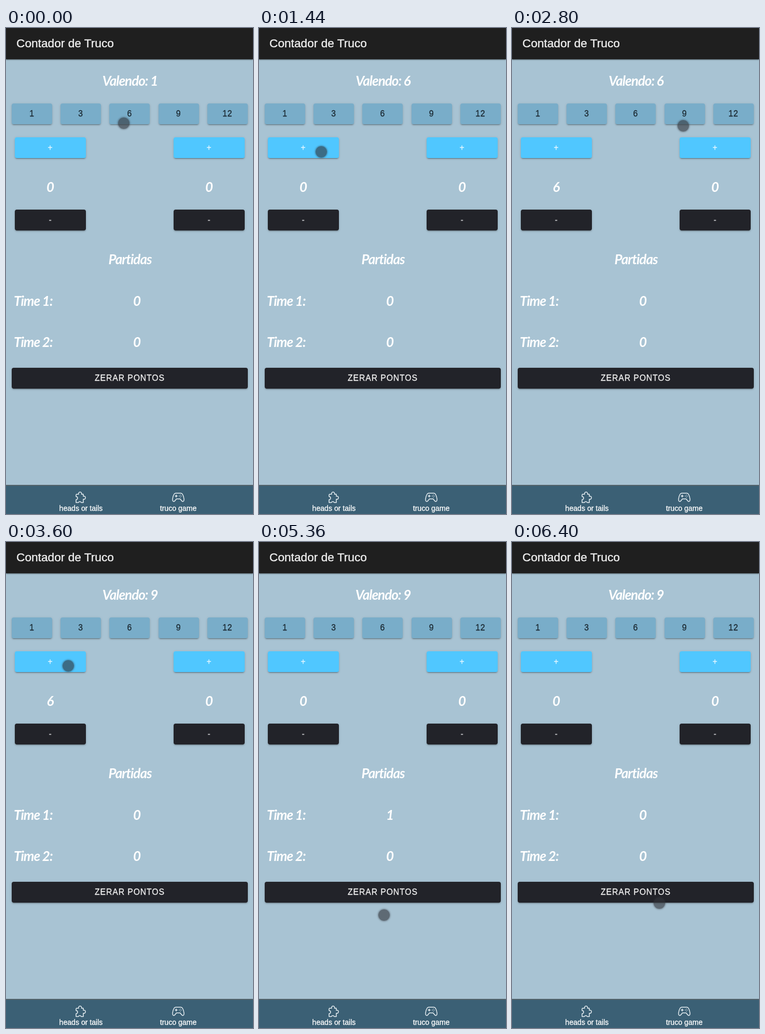
An HTML page for the animation above (6.48 s loop, 476 by 934 pixels).

```html
<!DOCTYPE html>
<html lang="pt">
<head>
<meta charset="utf-8">
<title>Contador de Truco</title>
<style>
  html, body { margin: 0; width: 100%; height: 100%; overflow: hidden; }
  body { position: relative; background: #a8c3d3; font-family: "Liberation Sans", Arial, sans-serif; }
  body > * { position: absolute; box-sizing: border-box; white-space: pre; }

  header {
    left: 0; top: 0; width: 476px; height: 60px; padding-left: 20px;
    background: #1f1f1f; color: #f0f0f0; font-size: 22.7px; line-height: 59px;
    -webkit-text-stroke: .4px; box-shadow: 0 1px 2px rgba(0, 0, 0, .6);
  }
  footer {
    left: 0; top: 878px; width: 476px; height: 56px;
    background: #3b6075; border-top: 2px solid #52626a;
  }
  .tab {
    top: 915px; transform: translateX(-50%); color: #fff;
    font-size: 14.1px; line-height: 17px; -webkit-text-stroke: .3px;
  }
  svg {
    top: 890px; width: 24px; height: 24px; fill: none; stroke: #e8eff3;
    stroke-width: 1.5; stroke-linejoin: round; stroke-linecap: round;
  }

  .hand {
    color: #fff; font: italic 700 26px/40px Lato, sans-serif;
    letter-spacing: -1px; transform: translate(-50%, -50%);
  }
  .hand.left { transform: translateY(-50%); }

  .button {
    height: 40px; border-radius: 4px; text-align: center;
    font-size: 15.7px; line-height: 40px; letter-spacing: .06em; -webkit-text-stroke: .35px;
    box-shadow: 0 3px 1px -2px rgba(0, 0, 0, .2), 0 2px 2px rgba(0, 0, 0, .14), 0 1px 5px rgba(0, 0, 0, .12);
  }
  .button::after {
    content: ""; position: absolute; inset: 0; border-radius: 4px;
    background: var(--tint); opacity: var(--press, 0);
    box-shadow: 0 5px 5px -3px rgba(0, 0, 0, .3), 0 4px 8px 1px rgba(0, 0, 0, .22);
  }
  .value { background: #79adc9; color: #1c2b34; --tint: rgba(0, 0, 0, .2); }
  .plus { background: #50c7ff; color: #e4f6ff; --tint: rgba(255, 255, 255, .2); }
  .dark { background: #222329; color: #f0f0f0; --tint: rgba(255, 255, 255, .13); }
  .minus { color: #b9babd; }

  .cursor {
    width: 22px; height: 22px; margin: -11px; border-radius: 50%;
    background: rgba(48, 51, 58, .62); box-shadow: 0 0 3px 1px rgba(48, 51, 58, .45);
  }
</style>
</head>
<body>
<header>Contador de Truco</header>
<footer></footer>
<svg viewBox="0 0 24 24" style="left:132px"><path d="M5.5 6H9A3 3 0 1 1 14.5 6H18V10A3 3 0 1 1 18 15.5V22H14A3 3 0 0 0 8.5 22H4V16.5A3 3 0 0 0 4 10.5V7.5Q4 6 5.5 6Z" transform="translate(-1)"/></svg>
<svg viewBox="0 0 24 24" style="left:320px"><path d="M7 4H17C20.5 4 22 9 23 15 23.6 20 20.5 21.5 18 18L15.5 15H8.5L6 18C3.5 21.5 .4 20 1 15 2 9 3.5 4 7 4ZM8 7.5v4M6 9.5h4M16 7.5h.01M16 11.5h.01M14 9.5h.01M18 9.5h.01"/></svg>
<div class="tab" style="left:144.5px">heads or tails</div>
<div class="tab" style="left:332px">truco game</div>

<script>
  const LOOP = 6480, STEP = 80, HOLD = 240, FADE = 400;

  function add(className, text, x, y, width) {
    const el = document.createElement('div');
    el.className = className;
    el.textContent = text;
    el.style.left = x + 'px';
    el.style.top = y + 'px';
    if (width) el.style.width = width + 'px';
    document.body.append(el);
    return el;
  }
  const hand = (text, x, y, side = '') => add('hand ' + side, text, x, y);
  const button = (kind, text, x, y, width) => add('button ' + kind, text, x, y, width);

  const stake = hand('', 239, 101);
  const [, , six, nine] = [1, 3, 6, 9, 12].map((n, i) => button('value', n, 11 + i * 94.2, 144.5, 78));
  const [plus] = [17, 323].map(x => {
    button('dark minus', '-', x, 349, 137);
    return button('plus', '+', x, 210, 137);
  });
  const score = hand('', 85, 305);
  hand('0', 391, 305);
  hand('Partidas', 239, 444);
  hand('Time 1:', 15, 524, 'left');
  hand('Time 2:', 15, 603, 'left');
  const wins = hand('', 252, 524);
  hand('0', 252, 603);
  const reset = button('dark', 'ZERAR PONTOS', 11, 653, 455);
  const cursor = add('cursor', '', 0, 0);

  // Where the cursor rests; a button is clicked just before it leaves.
  const stop = (x, y, arrive, leave, target) => ({ x, y, arrive, leave, target });
  const stops = [
    stop(227, 183, 0, 0),
    stop(242, 187, 400, 880, six),
    stop(120, 238, 1440, 1760, plus),
    stop(160, 281, 1920, 1920),
    stop(330, 188, 2720, 3200, nine),
    stop(120, 238, 3600, 3920, plus),
    stop(241, 360, 4320, 4720),
    stop(241, 717, 5200, 5520),
    stop(284, 694, 5760, 6000, reset)
  ];
  const clicks = stops.filter(s => s.target);

  const clamp = v => Math.max(0, Math.min(1, v));
  const ease = v => v * v * (3 - 2 * v);
  const mix = (a, b, k) => a + (b - a) * k;

  function moveCursor(t) {
    const i = stops.findLastIndex(s => s.arrive <= t);
    const from = stops[i], to = stops[i + 1] || from;
    const k = ease(clamp((t - from.leave) / (to.arrive - from.leave)));
    cursor.style.transform = `translate(${mix(from.x, to.x, k)}px, ${mix(from.y, to.y, k)}px)`;
  }

  function pressLevel(t, release) {
    return t < release ? clamp((t - release + HOLD) / HOLD * 2) : clamp(1 - (t - release) / FADE);
  }

  function render(t) {
    let value = 1, points = 0, games = 0;
    for (const { target } of clicks.filter(c => t >= c.leave)) {
      if (target === plus) points += value;
      else if (target === reset) points = games = 0;
      else value = +target.textContent;
      if (points >= 12) { points = 0; games++; }
    }
    stake.textContent = 'Valendo: ' + value;
    score.textContent = points;
    wins.textContent = games;

    for (const { target } of clicks) {
      const levels = clicks.filter(c => c.target === target).map(c => pressLevel(t, c.leave));
      target.style.setProperty('--press', Math.max(...levels));
    }
    moveCursor(t);
  }

  const start = performance.now();
  function tick() {
    const t = (performance.now() - start) % LOOP;
    render(Math.floor(t / STEP) * STEP);
    requestAnimationFrame(tick);
  }
  tick();
</script>
</body>
</html>
```
